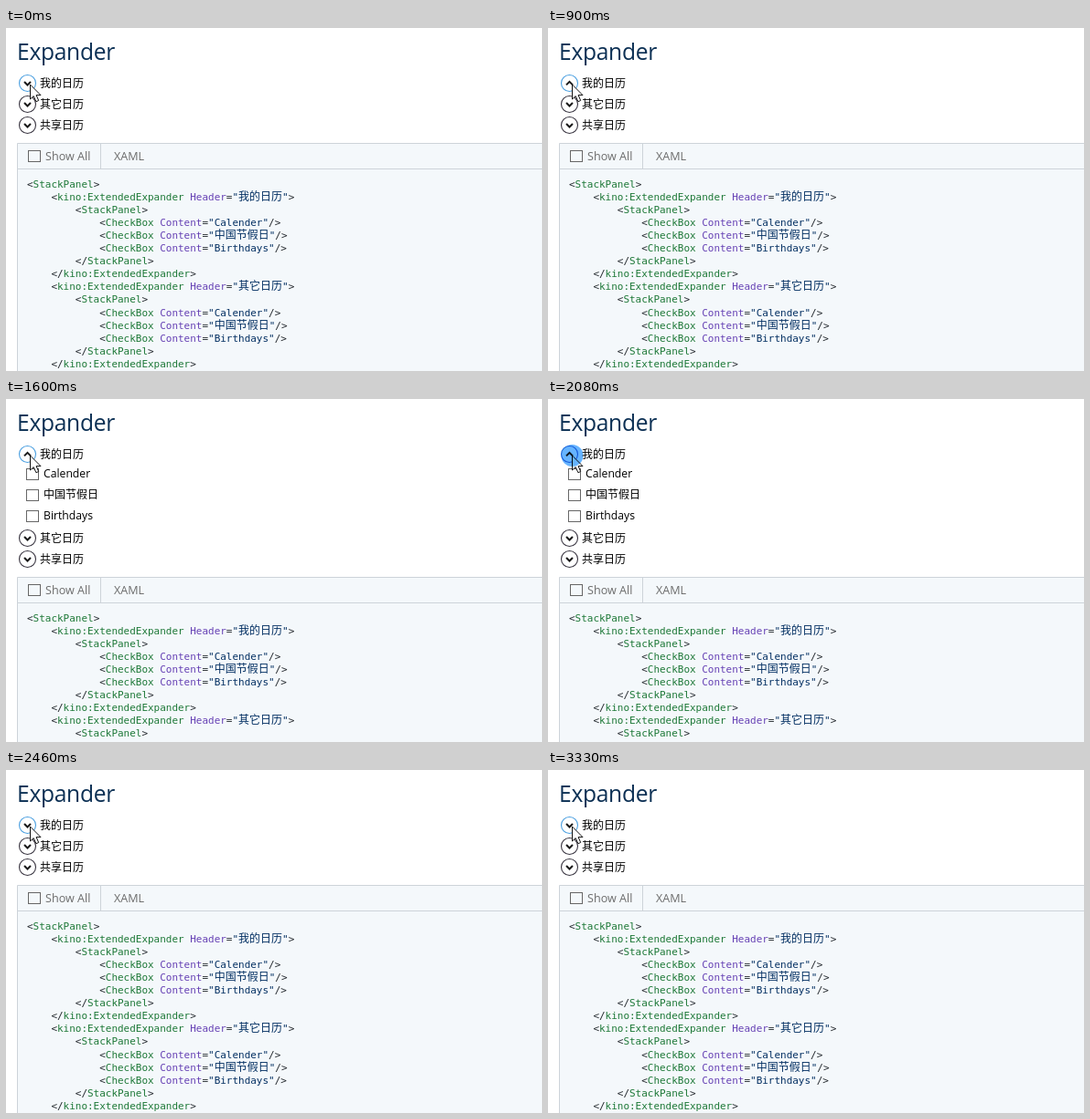
Animation, 586 px wide and 376 px high, one loop 3.39 s. Source, as an HTML page:

```html
<!DOCTYPE html>
<html lang="zh-CN">
<head>
<meta charset="utf-8">
<style>
html, body { margin: 0; width: 100%; height: 100%; overflow: hidden; background: #fff; }
svg { display: block; }
text { font: 12.2px "Open Sans", "Noto Sans", sans-serif; }
.title { font-size: 24.6px; letter-spacing: -.3px; fill: #0c3054; }
.tab { font-size: 12.6px; fill: #6c6c6c; }
.cjk { font: 12px "Noto Sans CJK SC", "Noto Sans CJK", sans-serif; letter-spacing: 0; }
.code { font: 11px "DejaVu Sans Mono", monospace; letter-spacing: -.022px; fill: #24292e; }
.tag { fill: #1d7837; }
.attr { fill: #6540b4; }
.str { fill: #032f62; }
.line { fill: none; stroke: #cdd3d9; }
.ring { fill: none; stroke: #37333f; stroke-width: 1.1; }
.hover { stroke: #4a9fe0; }
.chevron { fill: none; stroke: #1a1a1a; stroke-width: 2; }
.box { fill: none; stroke: #666; }
#press { fill: #66b4ff; mix-blend-mode: multiply; }
</style>
</head>
<body>
<svg width="586" height="376" viewBox="0 0 586 376">
  <clipPath id="clip"><rect id="window" x="12" y="72" width="300" height="0"/></clipPath>
  <rect width="586" height="376" fill="#fff"/>
  <text class="title" x="12" y="35">Expander</text>
  <g id="first"></g>
  <g clip-path="url(#clip)"><g id="items"></g></g>
  <g id="lower">
    <g id="others"></g>
    <rect x="12" y="126" width="574" height="400" fill="#f4f8fb"/>
    <path class="line" d="M586 126.5H12.5V530M12.5 154.5H586M103.5 126.5V154.5"/>
    <rect class="box" x="24.5" y="134.5" width="13" height="12"/>
    <text class="tab" x="43" y="145">Show All</text>
    <text class="tab" x="118" y="145">XAML</text>
    <g id="code"></g>
  </g>
  <path d="M26.5 62v16l3.7-3.4 2.7 6.1 2.8-1.2-2.6-5.9h4.9z" fill="#fff" stroke="#111"/>
  <circle id="press" cx="26.5" cy="62" r="12"/>
</svg>
<script>
const LOOP = 3390, GROWTH = 69;
const $ = id => document.getElementById(id);

const header = (y, label, hover = '') =>
  `<circle class="ring ${hover}" cx="23.5" cy="${y - .5}" r="9"/>
   <path class="chevron" d="M20 ${y - 2}l3.5 3.5 3.5-3.5"/>
   <text class="cjk" x="37" y="${y + 4}">${label}</text>`;

const item = (y, label, font = '') =>
  `<rect class="box" x="22.5" y="${y - 5.5}" width="13" height="12"/>
   <text class="${font}" x="41" y="${y + 4}">${label}</text>`;

const span = (name, s) => `<tspan class="${name}">${s}</tspan>`;

const highlight = line => line.replace(/"[^"]*"|\w+(?==)|[\w:]+|[<>]/g, s => {
  if (s === '<') return '&lt;';
  if (s === '>') return '&gt;';
  if (s[0] === '"') return span('str', s.replace(/[\u4e00-\u9fff]+/, c => span('cjk', c)));
  return span(/^(Header|Content)$/.test(s) ? 'attr' : 'tag', s);
});

const calendars = ['Calender', '中国节假日', 'Birthdays'];
const expander = name => [
  [1, `<kino:ExtendedExpander Header="${name}">`],
  [2, '<StackPanel>'],
  ...calendars.map(c => [3, `<CheckBox Content="${c}"/>`]),
  [2, '</StackPanel>'],
  [1, '</kino:ExtendedExpander>']
];
const lines = [[0, '<StackPanel>'], ...expander('我的日历'), ...expander('其它日历')];

$('first').innerHTML = header(61, '我的日历', 'hover');
$('others').innerHTML = header(84, '其它日历') + header(107, '共享日历');
$('items').innerHTML = calendars.map((c, i) => item(82 + 23 * i, c, i === 1 ? 'cjk' : '')).join('');
$('code').innerHTML = lines.map(([depth, s], i) =>
  `<text class="code" x="${23 + depth * 26.4}" y="${Math.floor(175 + i * 14.1)}">${highlight(s)}</text>`).join('');
const chevron = $('first').querySelector('.chevron');
const ring = $('first').querySelector('.ring');

function progress(t, click, tick) {
  const held = Math.floor((t - click) / tick) * tick;
  const p = Math.min(1, Math.max(0, (held - 90) / 290));
  return 1 - (1 - p) ** 2;
}

function draw(now) {
  const t = now % LOOP;
  const within = (a, b) => t >= a && t < b;
  const open = progress(t, 760, 74) - progress(t, 2080, 76);
  const shift = Math.round(GROWTH * open);
  const pressed = within(760, 840) || within(2080, 2156);
  $('lower').setAttribute('transform', `translate(0 ${shift})`);
  $('window').setAttribute('height', shift);
  $('items').setAttribute('opacity', open);
  $('press').style.display = pressed ? '' : 'none';
  ring.style.stroke = pressed ? '#2878d8' : '';
  chevron.setAttribute('transform', within(840, 2156) ? 'rotate(180 23.5 60.7)' : '');
}

const start = performance.now();
function frame() {
  draw(performance.now() - start);
  requestAnimationFrame(frame);
}
frame();
</script>
</body>
</html>
```
